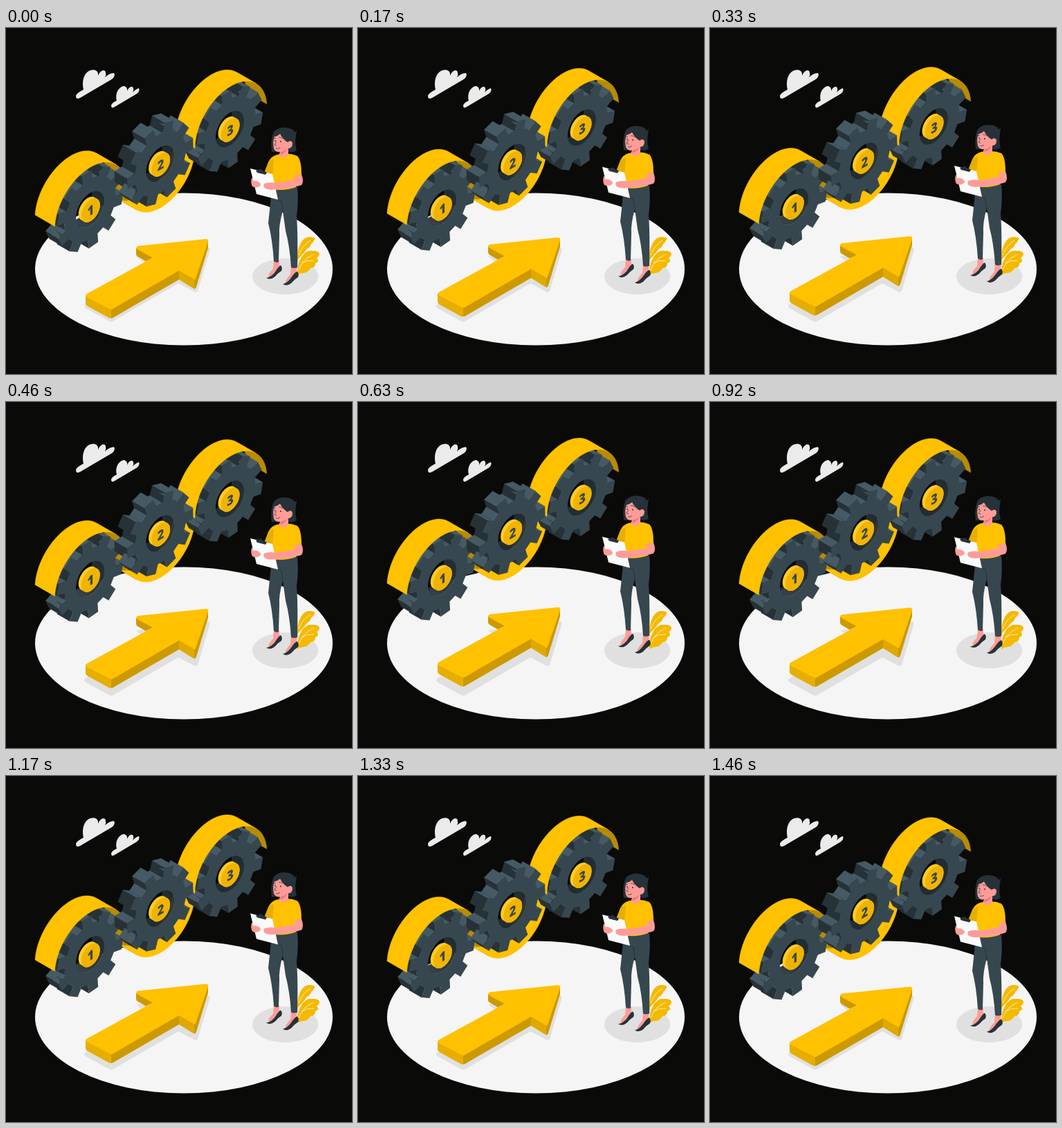
These frames come from a looping animation (500x500 px, 1.5 s). An HTML page:

```html
<!DOCTYPE html>
<html lang="en">
<head>
<meta charset="utf-8">
<style>
html, body { margin: 0; height: 100%; overflow: hidden; background: #0a0a08; }
svg { display: block; width: 100vw; height: 100vh; }
text { font: 800 19px "Open Sans", "Noto Sans", sans-serif; text-anchor: middle; fill: #37474f; }
</style>
</head>
<body>
<svg viewBox="0 0 500 500">
  <ellipse cx="257" cy="348.500" rx="215" ry="110" fill="#f5f5f5"/>

  <g fill="#ebebeb">
    <path d="M101 98Q102 94 112 89C108 70 118 58 129 61Q134 63 133 69C136 61 143 59 144 64Q145 68 143 71Q150 65 156 65Q159 69 153 74L107 101Q101 104 101 98Z"/>
    <path d="M152 112Q153 108 160 105C157 92 165 84 171 84Q176 86 175 91C178 84 183 83 184 87Q185 90 183 93Q188 88 192 87Q194 91 189 95L157 114Q152 117 152 112Z"/>
  </g>

  <g fill="#e0e0e0">
    <ellipse cx="403.500" cy="359" rx="47.500" ry="26"/>
    <path d="M188 330L292 317Q296 318 294 323L277 380Q275 383 272 381L249 369L156 423Q152 426 148 423L115 405Q111 402 115 399L207 346Z"/>
  </g>

  <g fill="#f5b900">
    <path d="M421 336C421 316 427 303 438 302Q448 302 446 306Q444 310 441 312Q440 317 435 319Q431 325 424 332Z"/>
    <path d="M421 357Q421 341 427 331Q434 320 444 322Q452 322 453 326Q453 330 449 332Q454 337 447 340Q447 347 440 347Q436 354 430 354Q425 354 421 357Z"/>
    <path d="M423 328Q429 313 440 307M423 350Q429 333 445 327M427 340Q435 335 445 336" fill="none" stroke="#fff" stroke-width=".7"/>
  </g>

  <g id="float">
    <g id="machine" transform="matrix(.866 -.5 0 1 121.500 262)"></g>

    <g id="arrow">
      <path d="M188 318V326Q188 329 190 330L202 337L214 331Z" fill="#cc9a00"/>
      <path d="M115 386V398Q115 400 118 402L149 419Q152 420 155 418V405Z" fill="#e6ae00"/>
      <path d="M152 406V419.500L155 418.500L250 363.500V350Z" fill="#cc9a00"/>
      <path d="M250 350V363.500L270 376Q273 378 274 375V362Z" fill="#e0a900"/>
      <path d="M272 363V377Q274 377 275 374L292 318V307Z" fill="#cc9a00"/>
      <path d="M191 315L288 305Q293 304.500 292 309L274 362Q273 365 270 362L250 350.500L155 405.500Q152 407.500 149 405.500L117 389Q113 386.500 117 384L212 332L190 320Q186 316 191 315Z" fill="#ffc100"/>
    </g>

    <g id="woman">
      <g fill="#ff9b97">
        <path d="M387 335L395 336Q394 345 398 349L380 360Q377 357 386 348Z"/>
        <path d="M412 343H421Q419 354 421 357L404 369Q402 366 411 356Z"/>
      </g>
      <path d="M376 361Q381 361 388 354Q394 344 397 343Q400 346 398 351Q393 354 389 359Q382 365 376 361ZM400 370Q406 369 412 361Q418 352 421 352Q424 356 422 360Q416 364 412 369Q405 374 400 370Z" fill="#263238"/>
      <path d="M385 230H421Q423 250 420 272Q422 300 421 346Q416 348 412 346Q410 315 404 293L400 264Q394 285 395 300L394 338Q391 340 387 337Q385 305 379 282Q382 255 384 232Z" fill="#37474f"/>
      <path d="M400 265L398 250Q394 249 391 246" fill="none" stroke="#263238" stroke-width=".9"/>
      <path d="M392 183Q383 185 379 194L374 207L385 212V233Q402 236 419 230L418 215L427 212Q427 191 421 185Q412 181 403 182Z" fill="#ffc100"/>
      <path d="M387 190L385 214L374 207L380 192Z" fill="#e6ae00"/>
      <path d="M417 213L427 211Q431 222 427 227Q412 232 391 233Q381 235 375 232Q371 230 373 225Q380 222 391 224L418 219Z" fill="#ff9b97"/>
      <path d="M384 179Q382 164 386 152C389 146 397 143 404 144C411 144 416 147 417 151L420 148L419 156Q417 168 420 177Q414 181 407 178L392 179Z" fill="#263238"/>
      <path d="M388 157Q393 156 396 153Q400 161 407 165Q412 161 414 166Q414 174 408 174L408 183Q401 191 394 184L396 179Q389 180 387 174Q385 164 388 157Z" fill="#ff9b97"/>
      <path d="M397 179Q403 178 407 174Q404 181 396 183Z" fill="#e9777c"/>
      <path d="M387 160L390 159M394 158Q397 157 400 160M391 164L388 169L391 170M390 174Q393 175 396 173" fill="none" stroke="#263238" stroke-width=".7"/>
      <circle cx="389" cy="163" r=".9" fill="#263238"/>
      <circle cx="397" cy="164" r="1" fill="#263238"/>
      <path d="M355 217Q361 213 366 219L368 228Q362 232 356 229Q353 223 355 217Z" fill="#ff9b97"/>
      <path d="M353 203L385 211L393 248L362 240Z" fill="#fafafa"/>
      <path d="M361 206L365 205Q368 202 371 206L377 209L375 212L363 209Z" fill="#263238"/>
      <path d="M355 222Q361 219 366 223Q370 226 366 229Q360 232 356 228ZM391 224Q380 222 373 225Q371 230 375 232Q381 235 391 233Z" fill="#ff9b97"/>
    </g>
  </g>
</svg>
<script>
// The machine lives in an isometric plane; depth runs along (-1, -1).
const YELLOW = "#ffc100", GOLD = "#b88b00", DARK = "#263238", MID = "#37474f", LIGHT = "#455a64";
const GEAR_DEPTH = 21, BELT_DEPTH = 33, PITCH = 36;

const polar = (x, y, r, deg) => {
  const a = deg * Math.PI / 180;
  return [x + r * Math.cos(a), y + r * Math.sin(a)];
};
const arc = (x, y, r, from, to, n = 90) =>
  Array.from({ length: n + 1 }, (_, i) => polar(x, y, r, from + (to - from) * i / n));
const sweep = (pts, depth, fill) => {
  const back = pts.map(([x, y]) => [x - depth, y - depth]).reverse();
  return `<path d="M${[...pts, ...back].join("L")}Z" fill="${fill}" stroke="${fill}" stroke-width=".3"/>`;
};
const edges = pts => pts.slice(1).map((b, i) => {
  const a = pts[i], dx = b[0] - a[0], dy = b[1] - a[1];
  return { a, b, front: dx > dy, up: dx + dy > 0, far: a[0] + a[1] + b[0] + b[1] };
});

function gear(x, y, phase, label) {
  const rim = [];
  for (let i = 0; i < 10; i++)
    for (const [r, da] of [[43, -11], [55.5, -8], [55.5, 8], [43, 11]])
      rim.push(polar(x, y, r, phase + i * PITCH + da));
  rim.push(rim[0]);
  const hole = arc(x, y, 23.5, 0, 360);
  const sides = edges(rim).filter(e => e.front).sort((p, q) => p.far - q.far)
    .map(e => sweep([e.a, e.b], GEAR_DEPTH, e.up ? LIGHT : DARK));
  const bore = sweep(arc(x, y, 23.5, -45, 135), GEAR_DEPTH - 1, DARK);
  const gap = arc(x - GEAR_DEPTH + 1, y - GEAR_DEPTH + 1, 23.5, 0, 360);
  return sides.join("") +
    edges(hole).filter(e => !e.front).map(e => sweep([e.a, e.b], GEAR_DEPTH - 1, DARK)).join("") +
    `<path d="M${rim.join("L")}ZM${hole.join("L")}Z" fill="${MID}" fill-rule="evenodd"/>
    <g transform="translate(${x + 1} ${y + 2})">
      <path d="M0 0L-4.800 -4.800" stroke="#ffcb26" stroke-width="31" stroke-linecap="round"/>
      <circle r="15.500" fill="#f0b400"/><text y="7">${label}</text>
    </g>`;
}

// Each arc turns its other side to the viewer where its tangent meets the depth axis.
const belt = (x, r, from, to, fill) => sweep(arc(x, -.5, r, from, to), BELT_DEPTH, fill);

document.getElementById("machine").innerHTML =
  belt(1, 60, 315, 360, GOLD) + belt(118, 57, 180, 135, GOLD) + belt(235, 60, 315, 356, GOLD) +
  belt(118, 57, 135, 0, YELLOW) +
  gear(0, 0, 12, 1) + gear(233, .5, 12, 3) +
  belt(1, 60, 184, 315, YELLOW) + belt(235, 60, 180, 315, YELLOW) +
  gear(117, -7.5, 34, 2);

// Linear bob of 10 units, 24 poses a second.
const floating = document.getElementById("float");
function draw(now) {
  const p = Math.floor(now % 1500 * .024) / 36;
  floating.setAttribute("transform", `translate(0 ${-10 * (1 - Math.abs(1 - 2 * p))})`);
  requestAnimationFrame(draw);
}
draw(performance.now());
</script>
</body>
</html>
```
